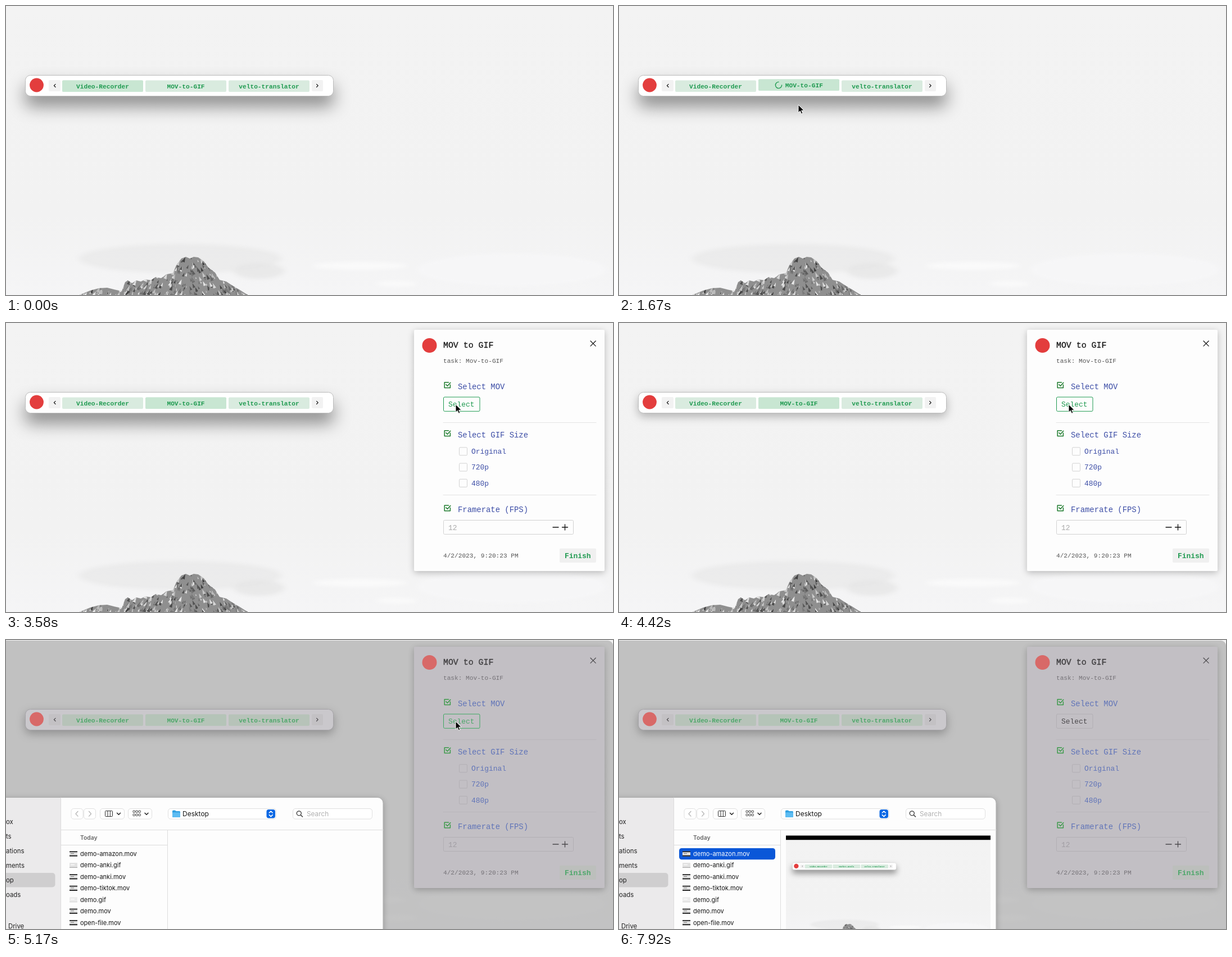
An HTML page for the animation above (8 s loop, 1080x515 px).

```html
<!DOCTYPE html>
<html lang="en">
<head>
<meta charset="utf-8">
<title>MOV to GIF</title>
<style>
html, body { margin: 0; width: 100%; height: 100%; overflow: hidden; background: #f3f3f3; }
svg { display: block; width: 100%; height: 100%; }
text { white-space: pre; }
.mono { font-family: "Liberation Mono", "Courier New", monospace; }
.ui { font-family: Inter, "Open Sans", sans-serif; }
.line { fill: none; stroke-linecap: round; stroke-linejoin: round; }
</style>
</head>
<body>
<svg id="stage" viewBox="0 0 1080 515"></svg>
<script>
const stage = document.getElementById('stage');
const LOOP = 8000;

// Colour that moves from its bright to its dimmed tone with --d
const mix = (a, b) => `color-mix(in srgb, ${a}, ${b} var(--d))`;
const C = {
  paper: mix('#fdfdfd', '#c2bfc4'),
  bar: mix('#ffffff', '#cac8cc'),
  edge: mix('#bcbcbc', '#a5a3a7'),
  red: mix('#e33d3d', '#d86968'),
  nav: mix('#f2f2f2', '#c3c1c4'),
  pill: mix('#d9ebdf', '#b7c3b9'),
  hot: mix('#c8e6d2', '#b5c4b8'),
  green: mix('#1f9a50', '#4da76a'),
  tick: mix('#1c7a2c', '#3c9a4a'),
  blue: mix('#3c4da6', '#6074b8'),
  ink: mix('#111111', '#4b494c'),
  soft: mix('#555555', '#757277'),
  faint: mix('#aaaaaa', '#a19ea4'),
  rule: mix('#e4e4e4', '#b9b6bb'),
  box: mix('#d2d2d2', '#b2afb4'),
  finish: mix('#f0f0f0', '#bcbfbc')
};

const rect = (x, y, w, h, r, fill, extra = '') =>
  `<rect x="${x}" y="${y}" width="${w}" height="${h}" rx="${r}" style="fill:${fill}" ${extra}/>`;
const frame = (x, y, w, h, r, stroke, fill = 'none', id = '') =>
  `<rect ${id && `id="${id}"`} x="${x}" y="${y}" width="${w}" height="${h}" rx="${r}" style="fill:${fill};stroke:${stroke}"/>`;
const line = (d, stroke, w = 1, extra = '') =>
  `<path class="line" d="${d}" style="stroke:${stroke};stroke-width:${w}" ${extra}/>`;
const text = (cls, x, y, size, fill, str, extra = '') =>
  `<text class="${cls}" x="${x}" y="${y}" font-size="${size}" style="fill:${fill}" ${extra}>${str}</text>`;
const dot = (x, y, r, fill) => `<circle cx="${x}" cy="${y}" r="${r}" style="fill:${fill}"/>`;

function rng(seed) {
  return () => (seed = (seed * 16807) % 2147483647) / 2147483647;
}

function wallpaper() {
  const ridge = 'M128 516 150 507 165 503 180 502 196 506 206 508 212 492 217 489 224 494 ' +
    '232 489 240 491 248 487 258 489 266 483 276 485 286 478 297 476 303 462 312 450 320 447 ' +
    '327 450 334 447 342 448 352 455 360 466 372 475 380 488 392 491 404 499 416 506 432 516Z';
  const rnd = rng(77);
  let rocks = '';
  for (let i = 0; i < 520; i++) {
    const x = 128 + rnd() * 300, y = 446 + rnd() * 70, s = 2 + rnd() * 5;
    const lean = x < 325 ? -1 : 1;
    const snow = rnd() < (x < 205 ? 0.7 : 0.42);
    const g = Math.round(snow ? 185 + rnd() * 55 : 55 + rnd() * 70);
    rocks += `<path d="M${x.toFixed(1)} ${y.toFixed(1)}l${(lean * s).toFixed(1)} ${(s * 1.3).toFixed(1)}` +
      ` ${(-lean * s * 0.8).toFixed(1)} ${(s * 0.3).toFixed(1)}z" fill="rgb(${g},${g},${g})"/>`;
  }
  const cloud = (x, y, rx, ry, fill, o) =>
    `<ellipse cx="${x}" cy="${y}" rx="${rx}" ry="${ry}" fill="${fill}" opacity="${o}"/>`;
  return `<g id="wall"><rect width="1080" height="515" fill="url(#sky)"/>
    <g filter="url(#soft)">
      ${cloud(310, 450, 180, 26, '#e6e6e6', 0.6)}${cloud(450, 472, 45, 14, '#e4e4e4', 0.7)}
      ${cloud(630, 463, 84, 7, '#fbfbfb', 0.9)}${cloud(695, 495, 36, 5, '#fbfbfb', 0.9)}
      ${cloud(900, 470, 170, 30, '#f7f7f8', 0.7)}
    </g>
    <path d="${ridge}" fill="#8f8f8f"/><g clip-path="url(#ridge)">${rocks}</g></g>
    <clipPath id="ridge"><path d="${ridge}"/></clipPath>`;
}

// Floating task bar; ids are only given to the live one
function bar(middle, live) {
  const id = n => live ? `id="${n}"` : '';
  const pill = (x, label, n) => `<g ${id(n)}>${rect(x, 132.5, 144, 20.5, 2, C.pill)}
    <g ${id(n + 'Hot')} opacity="0">${rect(x, 132.5, 144, 20.5, 2, C.hot)}</g>
    ${text('mono', x + 72, 146.7, 11.2, C.green, label, `text-anchor="middle" font-weight="700" ${id(n + 'Label')}`)}
    ${n === 'mov' && live ? `<g id="spin">${line('M5.6 0A5.6 5.6 0 1 1 0 -5.6', C.green, 1.4)}</g>` : ''}</g>`;
  return `<rect ${id('barBox')} x="34.5" y="123.5" width="548" height="37" rx="9"
      style="fill:${C.bar};stroke:${C.edge};filter:drop-shadow(0 18px 15px rgba(0,0,0,.42))"/>
    ${dot(54.5, 141, 12.4, C.red)}
    ${rect(76, 132, 21, 20, 2, C.nav)}${rect(544, 132, 20, 20, 2, C.nav)}
    ${line('M88 139.3l-2.6 2.6 2.6 2.6M552.6 139.3l2.6 2.6-2.6 2.6', C.ink, 1.2)}
    ${pill(100, 'Video-Recorder', 'video')}${pill(248, middle, 'mov')}${pill(396, 'velto-translator', 'trans')}`;
}

function panel() {
  const step = (y, label) =>
    line(`M790.4 ${y - 1}V${y + 4.5}H780.2V${y - 5.3}H787.5M782.8 ${y - 1.4}l2.6 2.6 5.4-6`, C.tick, 1.5) +
    text('mono', 804, y + 7, 13.9, C.blue, label);
  const option = (y, label) => frame(806.5, y - 7, 14, 14, 1.5, C.box, C.paper) +
    text('mono', 828, y + 4.3, 12.9, C.blue, label);
  return `<g id="panel">
    ${rect(726, 12, 339, 430, 3, C.paper, 'filter="url(#cast)"')}
    ${dot(753.5, 40, 13, C.red)}
    ${text('mono', 778, 44.3, 14.9, C.ink, 'MOV to GIF', 'stroke="#222" stroke-width=".3"')}
    ${text('mono', 778, 71, 11.15, C.soft, 'task: Mov-to-GIF')}
    ${line('M1040 32l9.2 9.2M1049.2 32l-9.2 9.2', C.ink, 1.2)}
    ${step(111, 'Select MOV')}
    ${frame(778.5, 132, 64.5, 25.3, 2, C.box, C.paper, 'selBox')}
    ${text('mono', 787, 149, 12.9, C.ink, 'Select', 'id="selText"')}
    ${line('M778 177.5H1050M778 306.5H1050', C.rule)}
    ${step(197, 'Select GIF Size')}
    ${option(228.8, 'Original')}${option(257, '720p')}${option(285.3, '480p')}
    ${step(330.3, 'Framerate (FPS)')}
    ${frame(778.5, 351.5, 231, 25, 2, C.box, C.paper)}
    ${text('mono', 787, 368.5, 12.9, C.faint, '12')}
    ${line('M973 364h10M989.5 364h10M994.5 359v10', C.ink, 1.3)}
    ${text('mono', 778, 418, 11.15, C.soft, '4/2/2023, 9:20:23 PM')}
    ${rect(985, 401.7, 65, 25.3, 2, C.finish)}
    ${text('mono', 994, 418.6, 12.9, C.green, 'Finish', 'font-weight="700"')}
  </g>`;
}

function dialog() {
  const side = [['ox', 324], ['ts', 350], ['ations', 376], ['ments', 402], ['op', 428], ['oads', 454]]
    .map(([s, y]) => text('ui', 0, y + 4, 11.4, '#222', s)).join('');
  const files = ['demo-amazon.mov', 'demo-anki.gif', 'demo-anki.mov', 'demo-tiktok.mov', 'demo.gif', 'demo.mov', 'open-file.mov'];
  const rows = files.map((name, i) => {
    const y = 381 + i * 20.45, mov = name.endsWith('mov');
    const icon = rect(113, y - 4.5, 14, 9, 0.5, i === 4 ? '#ececec' : '#e2e2e2') + (mov
      ? rect(113, y - 4.5, 14, 1.6, 0, '#111') + rect(113, y + 2.7, 14, 1.8, 0, '#111') + rect(115, y - 1, 6, 1, 0, '#777')
      : rect(113, y + 3.3, 14, 1.2, 0, i === 4 ? '#d8d8d8' : '#aaa') + rect(115, y - 1.5, 7, 1.2, 0, '#fff'));
    return icon + text('ui', 132, y + 4, 11, '#161616', name, i ? '' : 'id="first"');
  }).join('');
  let grid = '';
  for (let i = 0; i < 6; i++) grid += rect(226 + (i % 3) * 5, 304 + (i > 2) * 6, 3.4, 3.4, 0.6, 'none', 'stroke="#333" stroke-width=".9"');
  const button = (x, w) => frame(x + 0.5, 300.5, w, 18.5, 4.5, '#e0e0e0', '#fff');
  const down = x => line(`M${x - 3} 308.3l3 3 3-3`, '#222', 1.5);
  return `<g id="dialog">
    <rect x="-60" y="280.5" width="731" height="300" rx="10" fill="#fdfdfd" stroke="#aaa" filter="url(#cast)"/>
    ${rect(-10, 281, 107, 300, 0, '#ebeaeb')}
    ${rect(-10, 415, 97.5, 25.5, 5, '#cfcecf')}
    ${side}${text('ui', 4, 514, 11.4, '#222', 'Drive')}
    ${line('M97.5 281V516M98 338.5H671M287.5 339V516M98 365.5H287', '#dcdcdc')}
    ${button(115.5, 21)}${button(138, 21)}${button(167, 43)}${button(217, 42)}${button(288, 192)}${button(510, 141)}
    ${line('M128 305.3l-4 4.4 4 4.4M147.5 305.3l4 4.4-4 4.4', '#b5b5b5', 1.3)}
    ${frame(176.5, 304.5, 13, 10, 1, '#333')}${line('M181 305v9M185.3 305v9', '#333')}
    ${down(200.5)}${grid}${down(250)}
    <path d="M296 305q0-1.5 1.5-1.5h3.5l1.5 1.5h6q1.5 0 1.5 1.5v8q0 1.5-1.5 1.5h-11q-1.5 0-1.5-1.5z" fill="#2f9fe0"/>
    ${rect(296, 307.3, 14, 8.7, 1.3, '#5dbcf2')}
    ${text('ui', 314, 314, 12, '#161616', 'Desktop')}
    ${rect(463.5, 302, 15.5, 15.5, 4, '#0c68e4')}
    ${line('M468.3 308l3-3 3 3M468.3 311.6l3 3 3-3', '#fff', 1.5)}
    <circle cx="521.3" cy="308.8" r="4" fill="none" stroke="#333" stroke-width="1.3"/>
    ${line('M524.3 311.8l3.3 3.3', '#333', 1.4)}
    ${text('ui', 535, 314, 11.8, '#b0b0b0', 'Search')}
    ${text('ui', 132, 356.3, 10.3, '#666', 'Today', 'font-weight="600"')}
    <g id="chosen">${rect(107, 371, 171, 20.3, 4.5, '#0a57d8')}</g>
    ${rows}
    <g id="preview" style="--d:0%" clip-path="url(#film)">
      <g transform="translate(297 355.4) scale(.337)"><use href="#wall"/>${bar('Market-Deals', false)}</g>
      ${rect(297, 348.5, 364, 7.7, 0, '#000')}
    </g>
  </g>`;
}

stage.innerHTML = `<defs>
    <linearGradient id="sky" x1="0" y1="0" x2="0" y2="1">
      <stop offset="0" stop-color="#f3f3f3"/><stop offset=".72" stop-color="#f2f2f2"/><stop offset="1" stop-color="#f5f5f6"/>
    </linearGradient>
    <filter id="soft" x="-20%" y="-50%" width="140%" height="200%"><feGaussianBlur stdDeviation="6 3"/></filter>
    <filter id="cast" x="-10%" y="-10%" width="120%" height="120%">
      <feDropShadow dx="0" dy="3" stdDeviation="6" flood-color="#000" flood-opacity=".24"/>
    </filter>
    <clipPath id="film"><rect x="297" y="348" width="364" height="168"/></clipPath>
  </defs>
  ${wallpaper()}
  <rect id="dim" x="-20" y="1" width="1100" height="540" rx="9" fill="#8f8f8f"/>
  ${bar('MOV-to-GIF', true)}${panel()}${dialog()}
  <path id="mouse" d="M0 0V14.2L3.3 11.1 5.5 16.2 7.9 15.2 5.7 10.2H10.2Z" fill="#000" stroke="#fff" stroke-width="1" stroke-linejoin="round"/>`;

const el = {};
stage.querySelectorAll('[id]').forEach(e => el[e.id] = e);

const ramp = (t, a, b) => Math.min(1, Math.max(0, (t - a) / (b - a)));
const ease = (t, a, b) => { const k = ramp(t, a, b); return k * k * (3 - 2 * k); };
const alpha = (e, v) => e.setAttribute('opacity', v);
const place = (e, s) => e.setAttribute('transform', s);

// time, x, y of the pointer
const path = [
  [250, 330, 290], [1230, 321, 143], [1450, 320, 143], [1660, 319, 176], [2080, 319, 176],
  [2670, 762, 147], [2920, 800, 145], [5170, 800, 145], [5940, 217, 396], [6080, 217, 396], [6380, 217, 384.5]
];

function pointer(t) {
  let i = 0;
  while (i < path.length - 2 && t > path[i + 1][0]) i++;
  const [a, x, y] = path[i], [b, u, v] = path[i + 1], k = ease(t, a, b);
  return [x + (u - x) * k, y + (v - y) * k];
}

function draw(t) {
  const [mx, my] = pointer(t);
  place(el.mouse, `translate(${mx} ${my})`);
  alpha(el.mouse, t >= 250 && t < 7250 ? 1 : 0);

  const d = ease(t, 4560, 4900);
  stage.style.setProperty('--d', d * 100 + '%');
  alpha(el.dim, d * 0.5);

  // task bar
  alpha(el.videoHot, 1 - ramp(t, 80, 250));
  alpha(el.movHot, ramp(t, 1200, 1330));
  const lift = ease(t, 1220, 1350) - ease(t, 2720, 2860);
  place(el.mov, `translate(0 ${-2 * lift})`);
  const size = ease(t, 1300, 1550) * (1 - ease(t, 2440, 2700));
  const shift = ease(t, 1300, 1550) - ease(t, 2690, 2860);
  place(el.movLabel, `translate(${9.3 * shift} 0)`);
  place(el.spin, `translate(${278 + 6 * size} 143) rotate(${(t - 1670) * 0.36}) scale(${size})`);
  alpha(el.spin, size > 0 ? 1 : 0);
  el.barBox.style.filter = t < 4000
    ? 'drop-shadow(0 18px 15px rgba(0,0,0,.42))'
    : 'drop-shadow(0 6px 8px rgba(0,0,0,.26))';

  // form
  alpha(el.panel, ramp(t, 2200, 2330));
  const over = t >= 2900 && t < 5330;
  el.selBox.style.stroke = over ? mix('#1f9a50', '#3fa862') : C.box;
  el.selText.style.fill = over ? C.green : C.ink;

  // file picker
  alpha(el.dialog, ease(t, 4750, 5000));
  alpha(el.chosen, t >= 6420 ? 1 : 0);
  el.first.style.fill = t >= 6420 ? '#fff' : '#161616';
  alpha(el.preview, t >= 7080 ? 1 : 0);
}

const start = performance.now();
function tick() {
  draw((performance.now() - start) % LOOP);
  requestAnimationFrame(tick);
}
draw(0);
requestAnimationFrame(tick);
</script>
</body>
</html>
```
